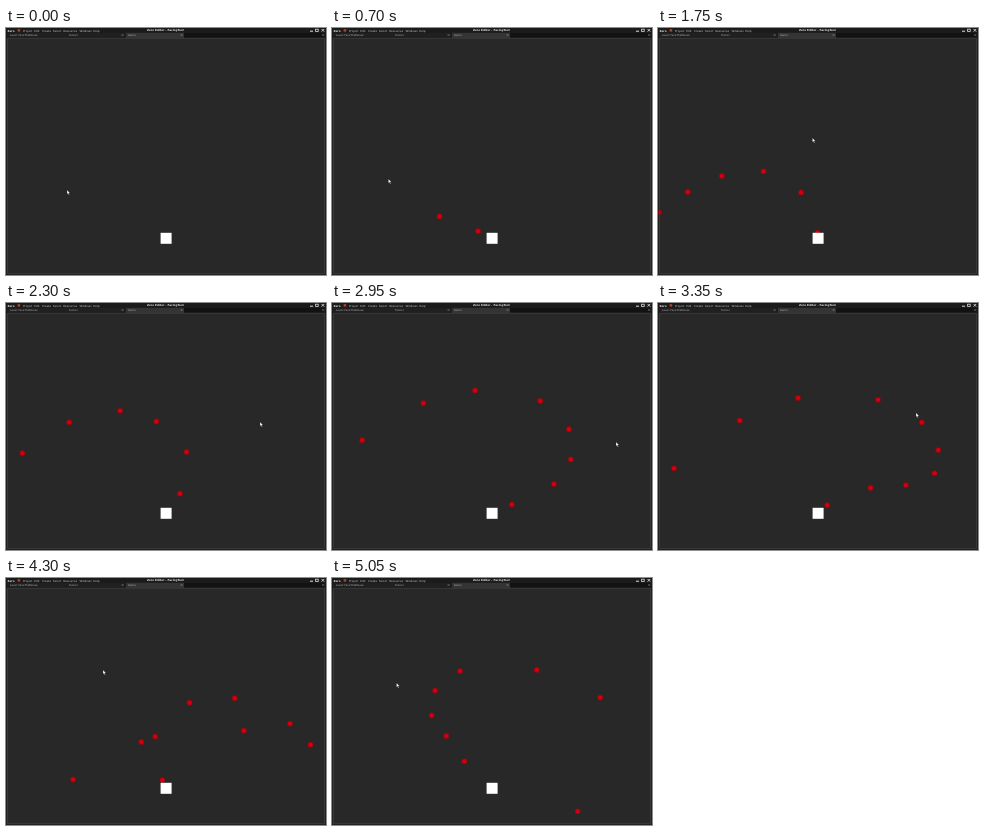
These frames come from a looping animation (320x247 px, 5.1 s). An HTML page:

```html
<!DOCTYPE html>
<html lang="en">
<head>
<meta charset="utf-8">
<title>Facing test</title>
<style>
  html, body { margin: 0; width: 100%; height: 100%; overflow: hidden; background: #282828; }
  svg { display: block; width: 100vw; height: 100vh; }
  text { font: 2.75px "DejaVu Sans", sans-serif; fill: #c4c4c4; text-rendering: geometricPrecision; }
  .bold { font-weight: bold; fill: #e2e2e2; }
  .tab { font-size: 2.6px; fill: #b4b4b4; }
</style>
</head>
<body>
<svg viewBox="0 0 320 247" preserveAspectRatio="none">
  <rect width="320" height="247" fill="#282828"/>

  <g id="balls" fill="#d0000e" stroke="#8c060c" stroke-width=".6"></g>
  <rect x="154.6" y="204.8" width="11" height="11" fill="#fff"/>

  <g id="chrome">
    <rect width="320" height="10" fill="#1b1b1b"/>
    <rect x="1" y="4.8" width="117.5" height="4.6" fill="#202020"/>
    <rect x="120" y="4.8" width="58" height="5.2" fill="#343434"/>
    <rect x="178" y="5" width="140" height="4.4" fill="#121212"/>
    <path d="M1.5 10.3H318.5V245.6H1.5Z" fill="none" stroke="#3d3d3d" stroke-width=".8"/>
    <path d="M.3 0V247M319.7 0V247M0 246.7H320" stroke="#1c1c1c" stroke-width=".6"/>
    <rect x="11.6" y="1.2" width="2.6" height="2.4" fill="#b8402a"/>
    <path d="M304 3.2h3" stroke="#ddd" stroke-width="1"/>
    <rect x="309.6" y="1.2" width="2.6" height="2.2" fill="none" stroke="#ddd" stroke-width=".8"/>
    <path d="M315.6 1l2.6 2.6m0-2.6l-2.6 2.6" stroke="#ddd" stroke-width=".9"/>
    <path d="M115.8 6.2l1.6 1.6m0-1.6l-1.6 1.6M174.8 6.2l1.6 1.6m0-1.6l-1.6 1.6M316.3 6.2l1.6 1.6m0-1.6l-1.6 1.6"
      stroke="#999" stroke-width=".5"/>
  </g>

  <path id="cursor" d="M0 0V4.2L1 3.3L1.8 5L2.5 4.7L1.7 3.1H3Z" fill="#fff" stroke="#111" stroke-width=".25"/>
</svg>

<script>
const NS = "http://www.w3.org/2000/svg";
const LOOP = 5100, STEP = 50;
const ORIGIN = { x: 160, y: 210.2 };
const SPEED = 230, DRAG = 0.69, FALL = 167.5; // px/s, 1/s, terminal px/s

// Launch time (s) and sideways speed (px/s) of every shot
const shots = [
  [0.42, -206], [0.63, -204], [0.835, -192], [1.032, -170], [1.255, -130],
  [1.505, -75], [1.726, -20.5], [1.955, 67], [2.189, 130], [2.403, 173],
  [2.6, 199], [2.852, 208.5], [3.06, 200], [3.295, 171], [3.53, 115],
  [3.765, 52.5], [4.03, -43.7], [4.26, -93.5], [4.485, -129], [4.68, -140],
  [4.865, -159]
];

// Pointer tip: time (s), x, y
const pointer = [
  [0, 61, 162], [0.25, 53.5, 158.5], [0.5, 53.5, 158], [0.63, 54, 155], [0.835, 61, 143],
  [1.03, 74, 128], [1.2, 93, 117], [1.5, 127, 113], [1.73, 151, 110], [1.96, 190, 109],
  [2.19, 230, 110], [2.3, 254, 119], [2.4, 266, 120], [2.6, 283, 138], [2.85, 284.5, 150],
  [2.95, 284, 139], [3.06, 285, 135], [3.3, 268, 112], [3.53, 222, 102], [3.75, 183, 96],
  [4.03, 138, 95], [4.3, 97, 92], [4.49, 85, 99], [4.68, 77, 103], [4.87, 66, 108], [5.05, 64.5, 105]
];

const labels = [
  ["Zero", 1.5, 3.5, "bold"], ["Project", 17, 3.5], ["Edit", 28.3, 3.5], ["Create", 36, 3.5],
  ["Select", 46.8, 3.5], ["Resources", 57.2, 3.5], ["Windows", 73.4, 3.5], ["Help", 87.3, 3.5],
  ["Zero Editor - FacingTest", 141, 3.3, "bold"],
  ["Level: FaceTheMouse", 4, 8, "tab"], ["Tunnel", 63, 8, "tab"], ["Game", 122, 8, "tab"]
];

function add(parent, name, attrs) {
  const el = document.createElementNS(NS, name);
  for (const key in attrs) el.setAttribute(key, attrs[key]);
  return parent.appendChild(el);
}

const chrome = document.getElementById("chrome");
for (const [text, x, y, style = ""] of labels) {
  add(chrome, "text", { x, y, class: style }).textContent = text;
}

const ballLayer = document.getElementById("balls");
const balls = shots.map(([birth, vx]) => ({
  birth, vx, vy: -Math.sqrt(SPEED * SPEED - vx * vx),
  el: add(ballLayer, "circle", { r: 2.6 })
}));
const cursor = document.getElementById("cursor");

// Flight under gravity with linear air drag
function placeBall(ball, time) {
  const age = time - ball.birth;
  ball.el.style.display = age > 0 ? "" : "none";
  if (age <= 0) return;
  const reach = (1 - Math.exp(-DRAG * age)) / DRAG;
  ball.el.setAttribute("cx", ORIGIN.x + ball.vx * reach);
  ball.el.setAttribute("cy", ORIGIN.y + (ball.vy - FALL) * reach + FALL * age);
}

function pointerAt(time) {
  const i = pointer.findIndex(p => p[0] > time);
  if (i < 0) return pointer[pointer.length - 1].slice(1);
  const [t0, x0, y0] = pointer[i - 1], [t1, x1, y1] = pointer[i];
  const k = (time - t0) / (t1 - t0);
  return [x0 + (x1 - x0) * k, y0 + (y1 - y0) * k];
}

function draw() {
  let ms = Math.floor(performance.now() % LOOP / STEP) * STEP;
  if (ms > 250 && ms < 500) ms = 250; // the scene rests before the first shot
  const time = ms / 1000;
  balls.forEach(ball => placeBall(ball, time));
  cursor.setAttribute("transform", `translate(${pointerAt(time)})`);
  requestAnimationFrame(draw);
}
draw();
</script>
</body>
</html>
```
